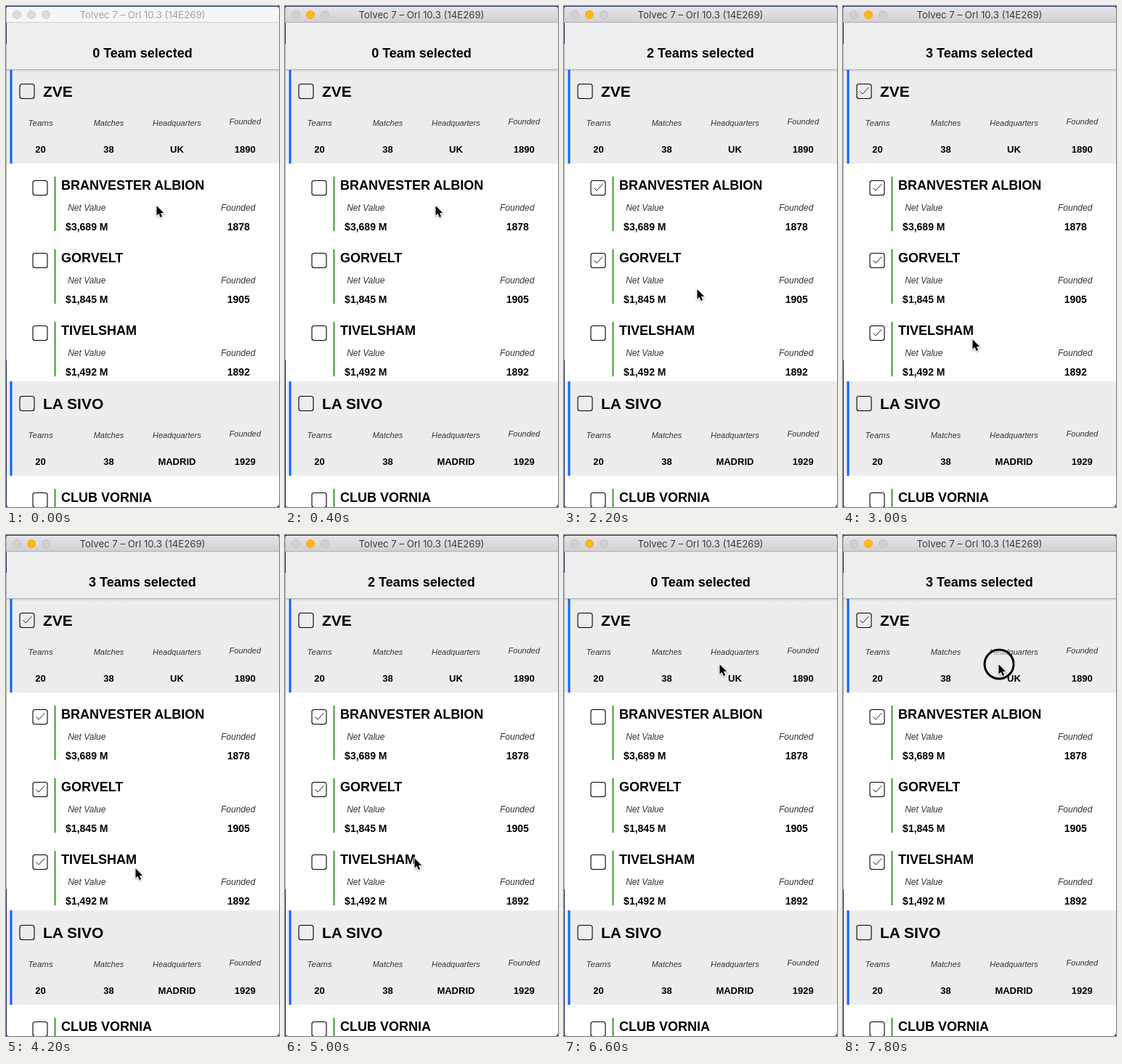
Write an HTML page that moves like this. It is 376 px wide and 690 px high and loops after 8000 ms.

```html
<!DOCTYPE html>
<html lang="en">
<head>
<meta charset="utf-8">
<title>Team picker</title>
<style>
  html, body { margin: 0; width: 100%; height: 100%; overflow: hidden; background: #fff; }
  svg { display: block; width: 376px; height: 690px; }
  text { font-family: "Liberation Sans", Arial, sans-serif; fill: #000; }
  .bold { font-weight: 700; }
  .note { font-style: italic; fill: #333; }
  .mid { text-anchor: middle; }
  .title { font: 400 13.2px Inter, sans-serif; }
</style>
</head>
<body>
<svg id="stage" viewBox="0 0 376 690" xmlns="http://www.w3.org/2000/svg">
  <defs>
    <linearGradient id="bar" x2="0" y2="1">
      <stop offset="0" stop-color="#e9e6ea"/><stop offset="1" stop-color="#d3d0d5"/>
    </linearGradient>
    <linearGradient id="shade" x2="0" y2="1">
      <stop offset="0" stop-color="#000" stop-opacity=".12"/><stop offset="1" stop-color="#000" stop-opacity="0"/>
    </linearGradient>
  </defs>
</svg>
<script>
const stage = document.getElementById("stage");
const LOOP = 8000, STEP = 200, NAVY = "#1d2b57";

function add(tag, attrs, text) {
  const el = document.createElementNS("http://www.w3.org/2000/svg", tag);
  for (const k in attrs) el.setAttribute(k, attrs[k]);
  if (text) el.textContent = text;
  return stage.appendChild(el);
}
const rect = (x, y, width, height, fill) => add("rect", { x, y, width, height, fill });
const label = (x, y, size, cls, text) => add("text", { x, y, "font-size": size, class: cls }, text);
const show = (el, on) => el.setAttribute("visibility", on ? "visible" : "hidden");

// Returns the tick mark of the box
function checkbox(x, y) {
  add("rect", { x, y: y + .5, width: 20, height: 20, rx: 3, fill: "none", stroke: "#000", "stroke-width": 1.1 });
  return add("path", {
    d: `M${x + 4.5} ${y + 10.5}l3.6 3.6l8.3-9`, fill: "none",
    stroke: "#222", "stroke-width": 1, visibility: "hidden"
  });
}

function league(y, name, place, year) {
  rect(1, y, 375, 130, "#ededed");
  rect(5.5, y, 3, 130, "#0a64ff");
  label(51, y + 38, 21, "bold", name);
  const cols = [["Teams", 20, 11.5, 78], ["Matches", 38, 11, 77.5], ["Headquarters", place, 11, 77.5], ["Founded", year, 11, 76]];
  cols.forEach(([head, value, size, dy], i) => {
    const x = 47.6 + i * 93.9;
    label(x, y + dy, size, "note mid", head);
    label(x, y + 114.5, 13, "bold mid", String(value));
  });
  return checkbox(19, y + 20);
}

function team(y, name, value, year) {
  rect(66.5, y + 18, 2, 75, "#3a9a2c");
  label(76, y + 35.5, 18, "bold", name);
  label(111.3, y + 65, 12, "note mid", "Net Value");
  label(319.7, y + 65, 12, "note mid", "Founded");
  label(111.3, y + 92, 14, "bold mid", value);
  label(320.3, y + 92, 14, "bold mid", year);
  return checkbox(37, y + 23);
}

rect(0, 0, 376, 690, "#fff");
const allTick = league(87, "ZVE", "UK", 1890);
const ticks = [
  team(217, "BRANVESTER ALBION", "$3,689 M", "1878"),
  team(317, "GORVELT", "$1,845 M", "1905"),
  team(417, "TIVELSHAM", "$1,492 M", "1892")
];
league(517, "LA SIVO", "MADRID", 1929);
team(647, "CLUB VORNIA", "$3,580 M", "1902");

rect(0, 23, 376, 64, "#eeeeee");
rect(0, 87, 376, 1, "#b5b5b5");
rect(0, 88, 376, 3, "url(#shade)");
const count = label(188, 71, 18, "bold mid", "0 Team selected");

// Window chrome
const bar = rect(0, 0, 376, 22, "#f6f6f6");
const edge = rect(0, 22, 376, 1, "#d0d0d0");
const lights = [15, 35, 55].map(cx =>
  add("circle", { cx, cy: 12, r: 5.6, "stroke-width": .8 }));
const title = add("text", { x: 188, y: 16.7, class: "title mid" }, "Tolvec 7 – Orl 10.3 (14E269)");
rect(0, 0, 1, 690, "#b4b4b4");
rect(0, 23, 1, 29, NAVY);
rect(0, 488, 1, 202, NAVY);
rect(0, 0, 376, 1, "#24386b");
for (const d of ["M0 0h5q-5 0-5 5z", "M376 0h-5q5 0 5 5z", "M0 690h5q-5 0-5-5z", "M376 690h-5q5 0 5-5z"])
  add("path", { d, fill: NAVY });

const ring = add("circle", { r: 20, fill: "#eee", "fill-opacity": .5, stroke: "#000", "stroke-width": 3 });
const pointer = add("path", {
  d: "M-.5 .3V13.5L2.5 10.8L4.8 16L7.1 15L4.9 9.9H9.2Z",
  fill: "#000", stroke: "#fff", "stroke-width": 2, "paint-order": "stroke",
  style: "filter: drop-shadow(0 1px 1px rgba(0,0,0,.35))"
});

// [from ms, x, y]
const moves = [
  [0, 208, 275], [1000, 197, 315], [1200, 185.5, 355], [1400, 185.5, 361],
  [2200, 184, 390], [2400, 180, 438], [2600, 179, 459],
  [5000, 179, 445], [5200, 196, 325], [5400, 215, 178]
];
// [from ms, teams ticked]
const picks = [
  [0, 0], [800, 1], [1800, 2], [3000, 3], [3600, 2], [4200, 3],
  [4600, 2], [5800, 3], [6600, 0], [7200, 3]
];
const presses = [200, 600, 5600, 6400, 7000, 7800];
const latest = (list, t) => list.filter(e => e[0] <= t).pop();

function draw(ms) {
  const t = Math.floor(ms % LOOP / STEP) * STEP;
  const [, x, y] = latest(moves, t);
  const n = latest(picks, t)[1];
  const active = t >= 400;

  ticks.forEach((tick, i) => show(tick, i < n));
  show(allTick, n === 3);
  count.textContent = `${n} Team${n > 1 ? "s" : ""} selected`;

  bar.setAttribute("fill", active ? "url(#bar)" : "#f6f6f6");
  edge.setAttribute("fill", active ? "#b0b0b0" : "#d0d0d0");
  title.style.fill = active ? "#3c3c3c" : "#a3a3a3";
  lights.forEach((dot, i) => {
    const lit = active && i === 1;
    dot.setAttribute("fill", lit ? "#fdb912" : active ? "#d2d0d3" : "#dcdcdc");
    dot.setAttribute("stroke", lit ? "#f0ab12" : active ? "#bcbabd" : "#c9c9c9");
  });

  pointer.setAttribute("transform", `translate(${x} ${y})`);
  ring.setAttribute("cx", x);
  ring.setAttribute("cy", y);
  show(ring, presses.includes(t));
}

let start;
function tick(now) {
  start ??= now;
  draw(now - start);
  requestAnimationFrame(tick);
}
draw(0);
requestAnimationFrame(tick);
</script>
</body>
</html>
```
